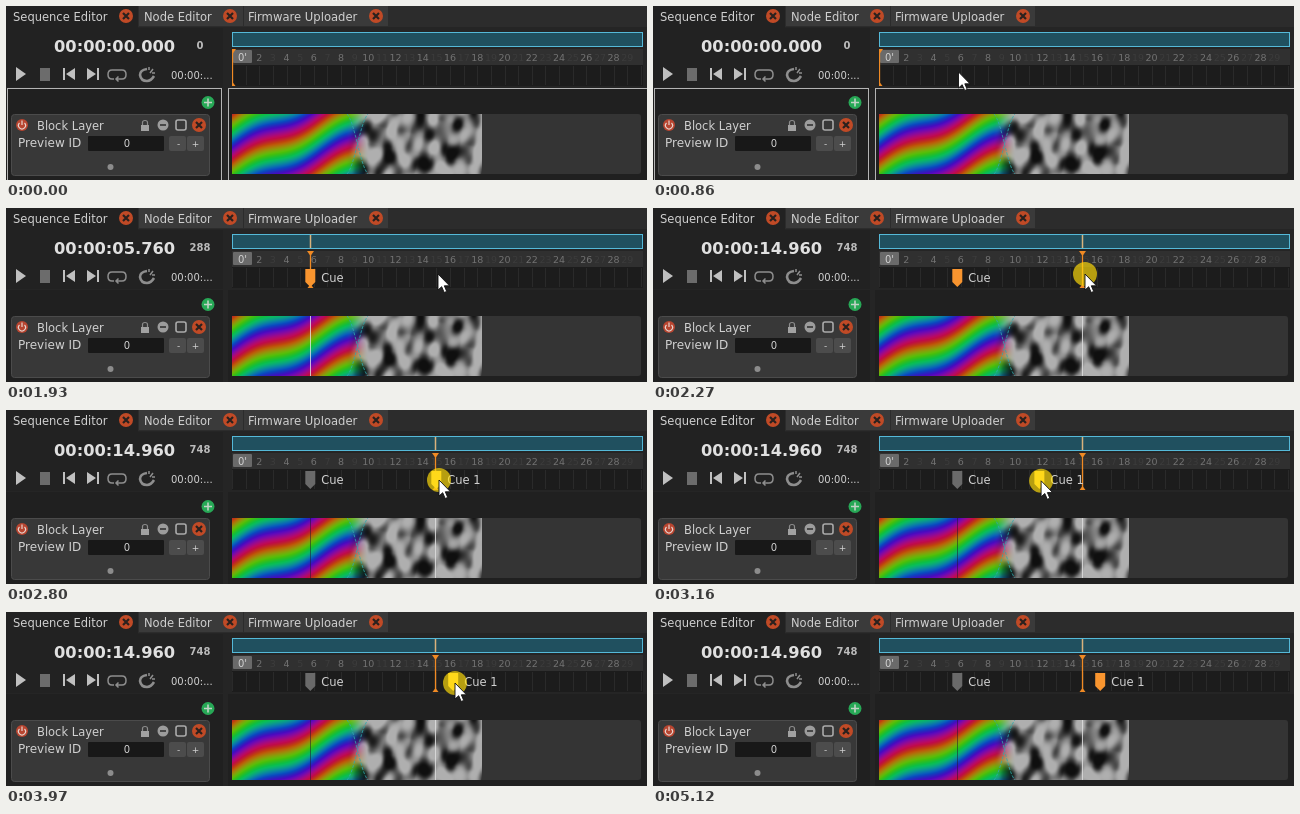
An HTML page with a canvas for the animation above (6050 ms loop, 641 by 174 pixels).

```html
<!DOCTYPE html>
<html lang="en">
<head>
<meta charset="utf-8">
<title>Sequence Editor</title>
<style>
html, body { margin: 0; width: 100%; height: 100%; overflow: hidden; background: #252525; }
svg { display: block; width: 641px; height: 174px; }
canvas { display: block; }
text { font: 11.5px "DejaVu Sans", Verdana, sans-serif; fill: #d0d0d0; }
.bold { font-weight: bold; }
.mid { text-anchor: middle; }
</style>
</head>
<body>
<svg viewBox="0 0 641 174">
  <defs>
    <g id="close">
      <circle r="7" fill="#c04a26"/>
      <path d="M-3 -3L3 3M3 -3L-3 3" stroke="#2a211e" stroke-width="2.2"/>
    </g>
    <path id="marker" d="M-5 61H5V74L0 79L-5 74Z"/>
    <clipPath id="rulerClip"><rect x="226" y="26" width="411" height="55"/></clipPath>
  </defs>

  <rect width="641" height="174" fill="#252525"/>
  <rect width="641" height="21" fill="#2c2c2c"/>
  <rect width="132" height="22" fill="#222"/>
  <rect x="133" width="104" height="20" fill="#3a3a3a"/>
  <rect x="238" width="144" height="20" fill="#3a3a3a"/>
  <text x="7" y="15">Sequence Editor</text>
  <text x="138" y="15">Node Editor</text>
  <text x="242" y="15" style="font-size:11.6px">Firmware Uploader</text>
  <use href="#close" x="120" y="10"/>
  <use href="#close" x="224" y="10"/>
  <use href="#close" x="370" y="10"/>

  <!-- transport -->
  <rect y="22" width="217" height="59" fill="#222"/>
  <text id="clock" class="bold" x="48" y="46" style="font-size:16.3px;fill:#e0e0e0"></text>
  <text id="count" class="bold mid" x="194" y="43" style="font-size:10px;fill:#bbb"></text>
  <text x="165" y="73" style="font-size:10px">00:00:...</text>
  <g fill="#c0c0c0">
    <path d="M10 61L20 68L10 75Z"/>
    <rect x="34" y="62" width="10" height="13" fill="#6c6c6c"/>
    <path d="M57 62h2v12h-2zM69 62V74L60 68Z"/>
    <path d="M81 62V74L90 68ZM91 62h2v12h-2z"/>
  </g>
  <g fill="none" stroke="#8e8e8e" stroke-width="1.5">
    <path d="M108 73H106Q102 73 102 68.500T106 64H116Q120 64 120 68.500T116 73H110M112.500 70.500L110 73L112.500 75.500"/>
    <path d="M141 63Q134 64 134 69Q135 75 141 75Q145 75 148 70" stroke-width="2.600"/>
    <path d="M144 67L147 63M143 61V64M146 67H149"/>
  </g>

  <!-- overview and ruler -->
  <rect x="226.500" y="26.500" width="410" height="14" fill="#20505f" stroke="#55b9d8"/>
  <rect x="226" y="43" width="411" height="37" fill="#1c1c1c"/>
  <rect x="226" y="43" width="411" height="16" fill="#303030"/>
  <g id="ruler"></g>
  <rect x="227" y="44" width="19" height="13" rx="1" fill="#6a6a6a"/>
  <text class="mid" x="236.500" y="55" style="font-size:10px">0'</text>

  <!-- layer list and track -->
  <rect y="82" width="217" height="92" fill="#202020"/>
  <rect x="222" y="82" width="419" height="92" fill="#202020"/>
  <g id="focus" fill="none" stroke="#b4b4b4">
    <rect x="1.500" y="82.500" width="214" height="100"/>
    <rect x="222.500" y="82.500" width="425" height="100"/>
  </g>
  <circle cx="202" cy="96.500" r="6.500" fill="#27a856"/>
  <path d="M198 96.500H206M202 92.500V100.500" stroke="#c2d2c6" stroke-width="1.600"/>
  <rect x="5.500" y="108.500" width="198" height="61" rx="3" fill="#383838" stroke="#4b4b4b"/>
  <circle cx="16" cy="119" r="6" fill="#b84530"/>
  <path d="M13.500 117A3.500 3.500 0 1 0 18.500 117M16 114.500V119" fill="none" stroke="#e6d4ce" stroke-width="1.200"/>
  <text x="31" y="124">Block Layer</text>
  <path d="M136.500 119V116.500Q136.500 114.500 139 114.500T141.500 116.500V119" fill="none" stroke="#8c8c8c" stroke-width="1.200"/>
  <rect x="135" y="119" width="8" height="6" fill="#a2a2a2"/>
  <circle cx="157" cy="119" r="5.500" fill="#9c9c9c"/>
  <path d="M154 119H160" stroke="#333" stroke-width="1.600"/>
  <rect x="170" y="114" width="10" height="10" rx="2" fill="none" stroke="#aaa" stroke-width="1.600"/>
  <use href="#close" x="193" y="119"/>
  <text x="12" y="141" style="font-size:12px">Preview ID</text>
  <rect x="82" y="130" width="76" height="15" rx="1" fill="#181818"/>
  <text class="mid" x="121" y="141" style="font-size:10px">0</text>
  <rect x="163" y="130" width="17" height="15" rx="2" fill="#4c4c4c"/>
  <rect x="181" y="130" width="17" height="15" rx="2" fill="#4c4c4c"/>
  <text class="mid" x="172.500" y="140.500" style="font-size:9px">-</text>
  <text class="mid" x="189.500" y="140.500" style="font-size:9px">+</text>
  <circle cx="104.500" cy="161" r="3" fill="#8c8c8c"/>
  <rect x="226" y="108" width="409" height="60" rx="3" fill="#343434"/>
  <foreignObject x="226" y="108" width="250" height="60"><canvas id="clip" width="250" height="60"></canvas></foreignObject>
  <g fill="none" stroke="#2fa9ad" stroke-dasharray="3 1.500" opacity=".8">
    <path d="M341 168C349 160 354 116 362 108"/>
    <path d="M341 108C349 116 354 160 362 168"/>
  </g>
  <path id="cueLine" d="M304.500 108V168" stroke="#241a30" opacity=".55"/>

  <!-- moving parts -->
  <path id="trackLine" d="M0 108V168" stroke="#ddd" opacity=".85"/>
  <g clip-path="url(#rulerClip)">
    <g id="playhead">
      <path id="overviewLine" d="M0 27V40" stroke="#d9b27c" stroke-width="1.500"/>
      <path d="M0 43V79" stroke="#f08a24" stroke-width="1.300"/>
      <path d="M-3.500 43H3.500L0 48ZM-3 80L0 76L3 80Z" fill="#f08a24"/>
    </g>
  </g>
  <g id="cueA"><use href="#marker"/><text x="11" y="74">Cue</text></g>
  <g id="cueB"><use href="#marker"/><text x="11" y="74">Cue 1</text></g>
  <circle id="press" r="12" fill="#ffdc0a" opacity=".68"/>
  <path id="pointer" d="M0 0V16L3.700 12.700L6.200 18.500L8.700 17.400L6.300 11.800H11.500Z" fill="#fff" stroke="#111" stroke-width=".9"/>
</svg>

<script>
const LOOP = 6050, ORIGIN = 226, UNIT = 13.63;
const $ = id => document.getElementById(id);
const clamp = v => Math.max(0, Math.min(1, v));
const smooth = v => v * v * (3 - 2 * v);
const mix = (a, b, k) => a + (b - a) * k;
const xAt = seconds => ORIGIN + UNIT * seconds;

function buildRuler() {
  let out = '';
  for (let n = 0; n <= 30; n++) {
    const x = xAt(n), even = n % 2 === 0;
    out += `<path d="M${Math.round(x) + 0.5} 60V79" stroke="#2a2a2a"/>`;
    if (n > 0 && n < 30)
      out += `<text class="mid" x="${x}" y="55" style="font-size:9.5px;fill:${even ? '#727272' : '#3c3c3c'}">${n}</text>`;
  }
  $('ruler').innerHTML = out;
}

const hash = (x, y) => {
  const v = Math.sin(x * 127.1 + y * 311.7 + 4.2) * 43758.5453;
  return (v - Math.floor(v)) * 2 * Math.PI;
};

// Gradient noise: a unit vector at every lattice point.
function noise(x, y) {
  const i = Math.floor(x), j = Math.floor(y), u = x - i, v = y - j;
  const corner = (a, b) => {
    const angle = hash(i + a, j + b);
    return Math.cos(angle) * (u - a) + Math.sin(angle) * (v - b);
  };
  const su = smooth(u), sv = smooth(v);
  return mix(mix(corner(0, 0), corner(1, 0), su), mix(corner(0, 1), corner(1, 1), su), sv);
}

function paintClip() {
  const ctx = $('clip').getContext('2d'), img = ctx.createImageData(250, 60);
  for (let y = 0; y < 60; y++) for (let x = 0; x < 250; x++) {
    const phase = (y + 0.45 * x + 4 * Math.sin(x / 14)) / 46;
    const gray = 15 + 160 * smooth(clamp(0.58 + 1.3 * noise(x / 13 + y / 60, y / 19 - x / 90)));
    const blend = smooth(clamp((x - 113) / 24));
    const p = (y * 250 + x) * 4;
    for (let c = 0; c < 3; c++) {
      const hue = 0.46 + 0.6 * Math.cos(2 * Math.PI * (phase - c / 3));
      img.data[p + c] = mix(10 + 180 * clamp(hue), gray, blend);
    }
    img.data[p + 3] = 255;
  }
  ctx.putImageData(img, 0, 0);
}

// start, end, steps, from x, from y, to x, to y
const pointerMoves = [
  [590, 860, 5, 463, 141, 305.5, 66],
  [1670, 1930, 5, 325, 66, 432, 66],
  [2540, 2541, 1, 433, 70, 433, 70],
  [2800, 3300, 8, 433, 70, 377, 71],
  [3630, 3970, 6, 384, 71.5, 449, 71],
  [4570, 4571, 1, 455, 71, 455, 71],
  [4770, 5120, 6, 462, 78, 620, 178]
];
const cueMoves = [
  [2130, 2131, 1, 430.3, 0, 430.3, 0],
  [2800, 3300, 8, 430.3, 0, 375.5, 0],
  [3630, 3970, 6, 376.3, 0, 447.2, 0]
];

function locate(moves, t) {
  const [start, end, steps, x0, y0, x1, y1] = moves.findLast(m => m[0] <= t) || moves[0];
  const step = Math.floor(clamp((t - start) / (end - start)) * (steps - 1) + 0.03);
  const k = steps > 1 ? smooth(step / (steps - 1)) : 1;
  return [mix(x0, x1, k), mix(y0, y1, k)];
}

const within = (t, a, b) => t >= a && t < b;
const show = (id, on) => $(id).style.display = on ? '' : 'none';
const move = (id, x, y = 0) => $(id).setAttribute('transform', `translate(${x} ${y})`);

function draw(t) {
  const seconds = t < 1330 ? 0 : t < 2200 ? 5.76 : 14.96;
  const head = Math.floor(xAt(seconds)) + 0.5;
  $('clock').textContent = '00:00:' + seconds.toFixed(3).padStart(6, '0');
  $('count').textContent = Math.round(seconds * 50);
  move('playhead', head);
  move('trackLine', head);
  show('trackLine', seconds > 0);
  show('overviewLine', seconds > 0);
  show('focus', t < 1330);
  show('cueLine', t >= 2400);

  move('cueA', 304.3);
  show('cueA', t >= 1470);
  $('cueA').setAttribute('fill', t < 1670 ? '#ffd23c' : t < 2400 ? '#f9952f' : '#6a6a6a');
  move('cueB', locate(cueMoves, t)[0]);
  show('cueB', t >= 2400);
  $('cueB').setAttribute('fill', t < 4570 ? '#ffd23c' : '#f9952f');

  const [x, y] = locate(pointerMoves, t);
  move('pointer', x, y);
  move('press', x, y);
  show('pointer', within(t, 590, 5120));
  show('press', within(t, 1260, 1400) || within(t, 2130, 2330) || within(t, 2800, 4360));
}

buildRuler();
paintClip();
const began = performance.now();
function tick() {
  draw((performance.now() - began) % LOOP);
  requestAnimationFrame(tick);
}
tick();
</script>
</body>
</html>
```
